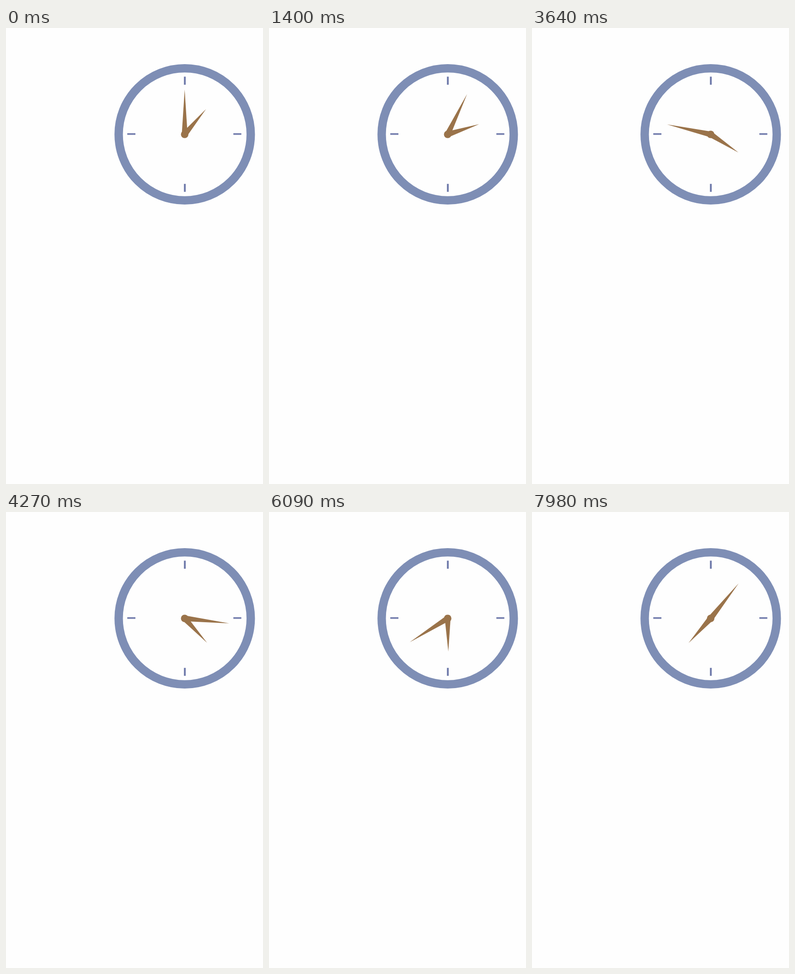
These frames come from a looping animation (562 by 997 pixels, 8000 ms). An HTML page:

```html
<!DOCTYPE html>
<html lang="en">
<head>
<meta charset="utf-8">
<title>Clock</title>
<style>
  html, body { margin: 0; width: 100%; height: 100%; overflow: hidden; background: #fefefe; }
  svg { display: block; width: 562px; height: 997px; }
</style>
</head>
<body>
<svg viewBox="0 0 562 997">
  <circle cx="390.8" cy="232.5" r="144.4" fill="#fefefe" stroke="#7e8eb5" stroke-width="18.4"/>
  <g fill="#757fae">
    <rect x="389" y="106.4" width="4.1" height="17.6"/>
    <rect x="389" y="340.8" width="4.1" height="17.4"/>
    <rect x="265.2" y="230" width="17.8" height="3.6"/>
    <rect x="497.2" y="230" width="17.4" height="3.6"/>
  </g>
  <g transform="translate(390.7 232.6)" fill="#9a734a">
    <path id="hour" d="M-6.4 0L0-72.4L6.4 0Z"/>
    <path id="minute" d="M-6.3 0L0-98L6.3 0Z"/>
    <circle r="8.2"/>
  </g>
</svg>
<script>
  const LOOP = 8000, STEP = 70;
  const hands = [
    { el: document.getElementById('hour'), start: 40.2, perStep: 1.594 },
    { el: document.getElementById('minute'), start: 0, perStep: 19.286 }
  ];
  const origin = performance.now();

  function draw(now) {
    const step = Math.floor((Math.max(0, now - origin) % LOOP) / STEP);
    for (const { el, start, perStep } of hands) {
      el.setAttribute('transform', `rotate(${start + perStep * step})`);
    }
    requestAnimationFrame(draw);
  }
  draw(origin);
</script>
</body>
</html>
```
